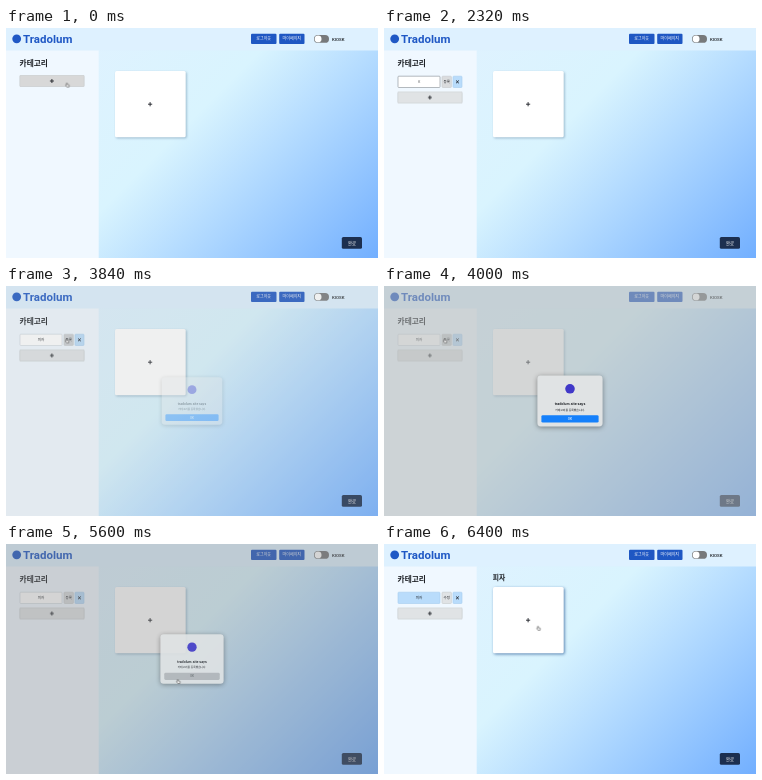
An HTML page for the animation above (6480 ms loop, 372x230 px).

```html
<!DOCTYPE html>
<html>
<head>
<meta charset="utf-8">
<title>카테고리</title>
<style>
html, body { margin: 0; width: 100%; height: 100%; overflow: hidden; }
body {
  background: linear-gradient(135deg, #e2f1ff 0, #d9f4fe 46%, #b5dcff 65%, #72afff 100%);
  width: 372px; height: 230px;
}
svg { display: block; width: 372px; height: 230px; }
text { font-family: 'Noto Sans CJK KR', 'Noto Sans CJK', 'Noto Sans CJK JP', sans-serif; fill: #1c1f24; font-weight: 500; }
.mid { text-anchor: middle; }
.head { font-weight: 700; }
.light { fill: #fff; }
.brand { font: 700 11.5px Roboto, sans-serif; fill: #1f58c5; }
.kiosk { font: 500 4.4px Roboto, sans-serif; }
.small { font-size: 3.5px; }
.plus { stroke: #1c1f24; stroke-width: .9; fill: none; }
.btn { fill: #e0e3e5; stroke: #c6c9cb; stroke-width: .6; }
.blue { fill: #b9dcfb; stroke: #a6cdee; stroke-width: .6; }
.t { animation: 6480ms step-end infinite; }

/* sidebar */
.add { animation-name: add; }
.addfill { animation-name: addfill; animation-timing-function: linear; }
.row { animation-name: row; }
.edit { animation-name: edit; }
.done { animation-name: done; }
.field { fill: #fff; stroke: #c9d2d9; stroke-width: .6; animation-name: field; }
.save { animation-name: save; }
.k1 { animation-name: k1; }
.k2 { animation-name: k2; }
.k3 { animation-name: k3; }
.k4 { animation-name: k4; }
@keyframes add { 0% { transform: none } 13.55%, 100% { transform: translateY(16.5px) } }
@keyframes addfill { 0%, 13.55% { fill: #d8d8d8 } 18.5%, 100% { fill: #e0e3e5 } }
@keyframes row { 0% { opacity: 0 } 13.55%, 100% { opacity: 1 } }
@keyframes edit { 0% { opacity: 1 } 88.85%, 100% { opacity: 0 } }
@keyframes done { 0% { opacity: 0 } 88.85%, 100% { opacity: 1 } }
@keyframes field { 0% { stroke: #c9d2d9 } 32% { stroke: #858b92 } 53.05%, 100% { stroke: #c9d2d9 } }
@keyframes save { 0% { fill: #cdd0d2 } 28% { fill: #dadcde } 51.8% { fill: #cbced1 } 67% , 100% { fill: #d8dadc } }
@keyframes k1 { 0% { opacity: 0 } 35.75% { opacity: 1 } 38.22%, 100% { opacity: 0 } }
@keyframes k2 { 0% { opacity: 0 } 38.22% { opacity: 1 } 39.46%, 100% { opacity: 0 } }
@keyframes k3 { 0% { opacity: 0 } 39.46% { opacity: 1 } 40.7%, 100% { opacity: 0 } }
@keyframes k4 { 0% { opacity: 0 } 40.7%, 100% { opacity: 1 } }

/* card */
.card { filter: drop-shadow(1.2px 1.6px 1.2px #5a7d9c80); animation-name: card; }
@keyframes card {
  0% { filter: drop-shadow(1.2px 1.6px 1.2px #5a7d9c80) }
  97.48%, 100% { filter: drop-shadow(1.2px 1.8px 1.6px #34649ccc) }
}

/* alert */
.dim { animation-name: dim; }
@keyframes dim {
  0% { fill: #b1b4b400 }
  59.21% { fill: #b1b4b433 }
  60.45% { fill: #b1b4b466 }
  61.68% { fill: #b1b4b48c }
  86.37% { fill: #84848459 }
  87.6% { fill: #87878733 }
  88.85% { fill: #8787871e }
  90.08% { fill: #87878710 }
  91.32% { fill: #87878706 }
  92.55%, 100% { fill: #87878700 }
}
.alert { transform-origin: 186px 115px; animation-name: alert; }
@keyframes alert {
  0% { opacity: 0; transform: scale(.9) }
  59.21% { opacity: .35; transform: scale(.93) }
  60.45% { opacity: .8; transform: scale(.98) }
  61.68% { opacity: 1; transform: none }
  86.37% { opacity: .88; transform: scale(.97) }
  87.6% { opacity: .35; transform: scale(.925) }
  88.85%, 100% { opacity: 0; transform: scale(.9) }
}
.panel { fill: #e0e3e4; filter: drop-shadow(0 1.5px 2.5px #0006); }
.ok { fill: #1580fb; animation-name: ok; }
@keyframes ok { 0% { fill: #1580fb } 83.9% { fill: #0d6de0 } 86.37%, 100% { fill: #b3b7ba } }
.oktext { animation-name: oktext; }
@keyframes oktext { 0% { fill: #fff } 86.37%, 100% { fill: #5c6063 } }

/* pointer */
.hand { animation-name: move; animation-timing-function: linear; }
@keyframes move {
  0%, 24.7% { transform: translate(59.5px, 54.6px) }
  32%, 44.4% { transform: translate(42px, 53px) }
  53.05%, 64.2% { transform: translate(59.2px, 52.4px) }
  75.3% { transform: translate(163px, 121px) }
  81.5%, 93.8% { transform: translate(170.4px, 135px) }
  98.7%, 100% { transform: translate(152.6px, 81.8px) }
}
.seen { animation-name: seen; }
@keyframes seen { 0% { opacity: 1 } 34.5% { opacity: 0 } 44.4%, 100% { opacity: 1 } }
</style>
</head>
<body>
<svg viewBox="0 0 372 230">
  <!-- top bar -->
  <rect width="372" height="22.5" fill="#def1ff"/>
  <circle cx="10.7" cy="10.8" r="4.4" fill="#1f58c5"/>
  <text class="brand" x="17" y="15">Tradolum</text>
  <g fill="#1f57c3">
    <rect x="245" y="5.8" width="25.5" height="10.2" rx="1"/>
    <rect x="273.2" y="5.8" width="25.3" height="10.2" rx="1"/>
  </g>
  <text class="mid light" x="257.7" y="12.4" font-size="4">로그아웃</text>
  <text class="mid light" x="285.8" y="12.4" font-size="4">마이페이지</text>
  <rect x="308" y="7" width="15" height="7.8" rx="3.9" fill="#77797b"/>
  <circle cx="312.1" cy="10.9" r="3.4" fill="#fff"/>
  <text class="kiosk" x="326" y="12.6">KIOSK</text>

  <!-- sidebar -->
  <rect y="22.5" width="92.7" height="207.5" fill="#f0f8ff"/>
  <text class="head" x="13.6" y="38.3" font-size="7.7">카테고리</text>
  <g class="t row">
    <g class="t edit">
      <rect class="t field" x="14" y="48.2" width="42" height="11.3" rx=".8"/>
      <g class="small">
        <text class="mid t k1" x="35" y="55.2">ㅍ</text>
        <text class="mid t k2" x="35" y="55.2">피</text>
        <text class="mid t k3" x="35" y="55.2">핒</text>
        <text class="mid t k4" x="35" y="55.2">피자</text>
      </g>
      <rect class="btn t save" x="58" y="48.2" width="9.4" height="11.3" rx=".8"/>
      <text class="mid small" x="62.7" y="55.2">등록</text>
    </g>
    <g class="t done">
      <rect class="blue" x="14" y="48.2" width="42" height="11.3" rx=".8"/>
      <text class="mid small" x="35" y="55.2">피자</text>
      <rect class="btn" x="58" y="48.2" width="9.4" height="11.3" rx=".8"/>
      <text class="mid small" x="62.7" y="55.2">수정</text>
    </g>
    <rect class="blue" x="69" y="48.2" width="9" height="11.3" rx=".8"/>
    <path class="plus" d="M72.1 52.5l2.7 2.7m0-2.7l-2.7 2.7"/>
  </g>
  <g class="t add">
    <rect class="btn t addfill" x="13.8" y="47.3" width="64.4" height="11.4" rx=".8"/>
    <path class="plus" d="M43.9 53h4m-2-2v4"/>
  </g>

  <!-- main -->
  <text class="head t done" x="108.7" y="35.6" font-size="6.8">피자</text>
  <rect class="t card" x="109" y="43" width="70.7" height="66.3" rx="1.6" fill="#fff"/>
  <path class="plus" d="M142 76.2h4.2m-2.1-2.1v4.2"/>
  <rect x="335.8" y="209" width="20.2" height="11.8" rx="1.6" fill="#1c2f50"/>
  <text class="mid light" x="345.9" y="216.5" font-size="4.3">완료</text>

  <!-- alert -->
  <rect class="t dim" width="372" height="230"/>
  <g class="t alert">
    <rect class="panel" x="153.4" y="89.5" width="65.2" height="51" rx="3.4"/>
    <circle cx="186" cy="102.8" r="4.8" fill="#4038c8"/>
    <text class="mid" x="186" y="118.8" style="font:700 3.4px Inter,sans-serif">tradolum.site says</text>
    <text class="mid" x="186" y="124.6" font-size="2.8">카테고리를 등록했습니다.</text>
    <rect class="t ok" x="157.4" y="129.2" width="57.2" height="7.4" rx="1.4"/>
    <text class="mid t oktext" x="186" y="134" style="font-family:Inter,sans-serif;font-size:3px">OK</text>
  </g>

  <!-- pointer -->
  <g class="t seen">
    <path class="t hand" fill="#f4f4f4" stroke="#333" stroke-width=".5" stroke-linejoin="round"
      d="M.9.6Q1.4 0 1.8.7V1.9L3.4 2.3Q3.9 2.5 3.8 3L3.4 4.5H1.5L.2 2.9Q.1 2.3.9 2.5Z"/>
  </g>
</svg>
</body>
</html>
```
